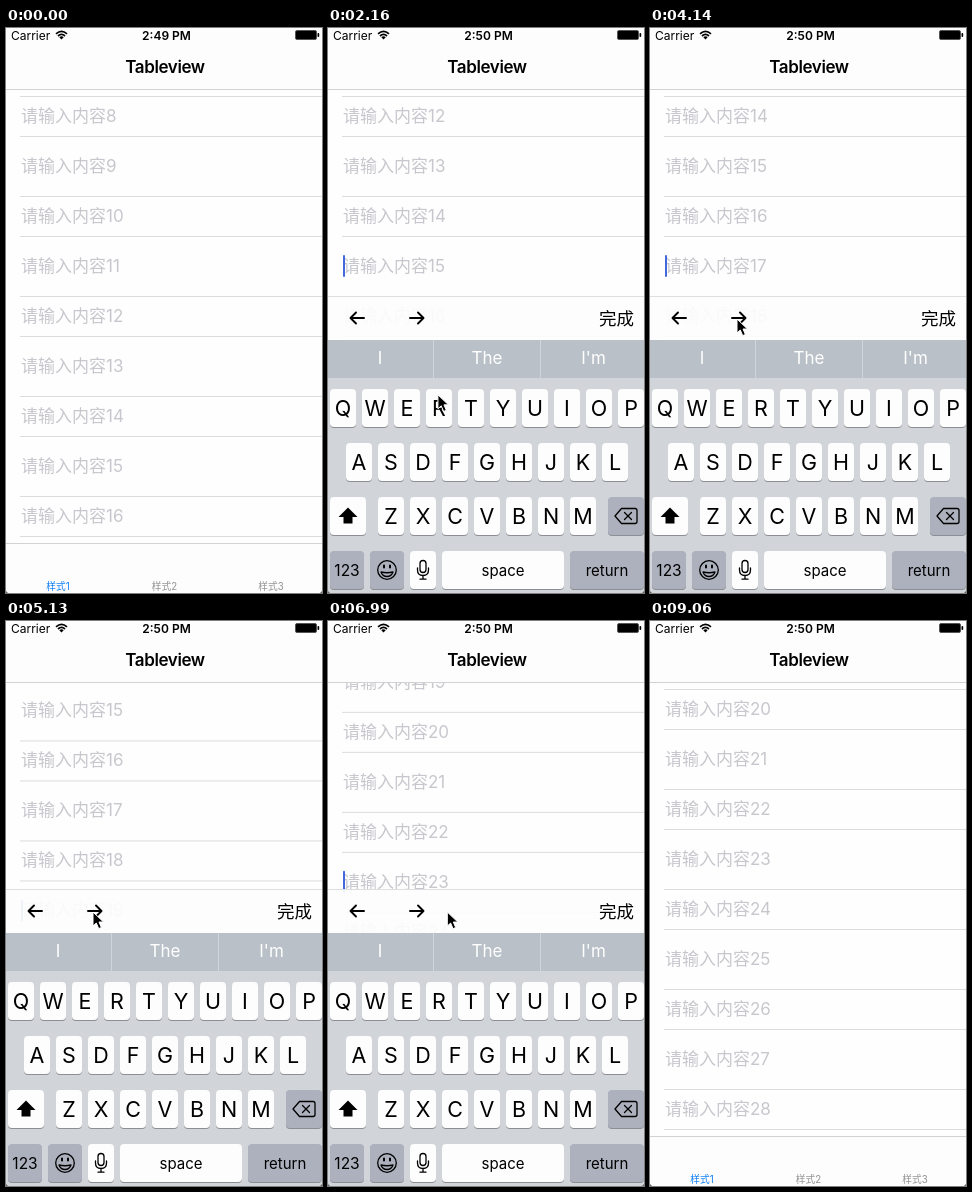
Write an HTML page that moves like this. It is 316 px wide and 565 px high and loops after 9160 ms.

```html
<!DOCTYPE html>
<html lang="zh-CN">
<head>
<meta charset="utf-8">
<title>Tableview</title>
<style>
html, body { margin: 0; width: 100%; height: 100%; overflow: hidden; background: #fefefe; }
svg { display: block; width: 316px; height: 565px; }
text { font-family: Inter, "Noto Sans CJK SC", "Noto Sans CJK", sans-serif; }
.mid { text-anchor: middle; }
.row { font-size: 17px; fill: #c7c7cd; }
.line { fill: none; stroke: #000; stroke-linecap: round; stroke-linejoin: round; }
</style>
</head>
<body>
<svg viewBox="0 0 316 565">
  <rect width="316" height="565" fill="#fefefe"/>
  <g id="list"></g>
  <rect id="caret" x="15" width="2" height="22" rx="1" fill="#4468dc"/>

  <rect width="316" height="61" fill="#fdfdfd"/>
  <rect y="61" width="316" height="1" fill="#d2d2d4"/>
  <text x="5" y="11.5" font-size="12">Carrier</text>
  <g class="line" stroke-width="1.7" style="stroke-linecap:butt">
    <path d="M50 5.8Q55.5 .9 61 5.8M52 8Q55.5 4.9 59 8"/>
  </g>
  <path d="M53.3 9.3Q55.5 7.4 57.7 9.3L55.5 11.6z"/>
  <text id="clock" class="mid" x="160.5" y="11.5" font-size="12" font-weight="600"></text>
  <rect x="289.5" y="2.5" width="21" height="9" rx="1.5" fill="#000" stroke="#555"/>
  <rect x="311.5" y="5" width="1.7" height="4" rx=".8"/>
  <text class="mid" x="159" y="45" font-size="17" font-weight="600" letter-spacing="-.4">Tableview</text>

  <rect y="515" width="316" height="50" fill="#fdfdfd"/>
  <rect y="515" width="316" height="1" fill="#d2d2d4"/>
  <g class="mid" font-size="9.7" fill="#929292">
    <text x="52" y="561.5" fill="#0a7cf5">样式1</text>
    <text x="158.5" y="561.5">样式2</text>
    <text x="265" y="561.5">样式3</text>
  </g>

  <g id="keyboard">
    <g id="toolbar">
      <rect y="268" width="316" height="44" fill="#fdfdfd" opacity=".93"/>
      <rect y="268" width="316" height="1" fill="#dededf"/>
      <path class="line" stroke-width="1.9" d="M36 290H23M28 284.5L22.5 290L28 295.5M82 290H95M90 284.5L95.5 290L90 295.5"/>
      <text class="mid" x="288.5" y="296.5" font-size="17.5">完成</text>
    </g>
    <rect y="312" width="316" height="253" fill="#d1d5da"/>
    <rect y="312" width="316" height="38" fill="#b9c0c7"/>
    <path d="M105.5 312v38M212.5 312v38" stroke="#d1d5da"/>
    <g class="mid" font-size="17" fill="#fff">
      <text x="52" y="336">I</text>
      <text x="159" y="336">The</text>
      <text x="265.5" y="336">I'm</text>
    </g>
    <g id="keys"></g>
    <path d="M20 479.5L29.5 489H24.5V495.5H15.5V489H10.5z"/>
    <path class="line" stroke-width="1.3" d="M287 488L293.5 480.5H307Q309 480.5 309 482.5V493.5Q309 495.5 307 495.5H293.5zM296.5 484.5L303.5 491.5M303.5 484.5L296.5 491.5"/>
    <g class="line" stroke-width="1.3">
      <circle cx="59" cy="542" r="9.3"/>
      <path d="M53 544Q59 545.5 65 544Q63.5 548.5 59 548.5T53 544z"/>
      <path d="M56 537.5v2M62 537.5v2" stroke-width="2"/>
      <rect x="92" y="532.5" width="6" height="12" rx="3"/>
      <path d="M89.5 540v2Q89.5 547.5 95 547.5T100.5 542v-2M95 547.5v3.5M92 551.2h6"/>
    </g>
  </g>

  <path d="M0 563v2h2zM316 563v2h-2z" fill="#666"/>
  <path id="cursor" d="M0 0V14L3.3 11L5.7 16.6L8.4 15.5L6 10H10.5z" stroke="#fff" stroke-linejoin="round"/>
</svg>
<script>
const LOOP = 9160, DURATION = 400, SHOW = 1584, HIDE = 8040, FIRST = 15;
// times at which the focus moves to the next field
const presses = [2960, 3650, 4350, 5036, 5300, 5560, 6170, 6759];
// pointer path: time, x, y
const path = [
  [480, 55, 568], [820, 95, 243], [1350, 131, 417], [1880, 131, 417],
  [2440, 89, 317], [2780, 87, 291], [6800, 87, 291], [6990, 119, 291],
  [7240, 200, 304], [7570, 284, 289], [8180, 284, 289], [8570, 291, 568]
];

const $ = id => document.getElementById(id);
const clamp = v => Math.min(1, Math.max(0, v));
const ramp = (t, start, length) => clamp((t - start) / length);
const ease = (t, start) => {
  const p = ramp(t, start, DURATION);
  return p * p * (3 - 2 * p);
};

// Even rows are 40 high, odd rows 60, so their centres lie 50 apart.
const padding = n => n % 2 ? 30 : 20;
let rows = '';
for (let n = 4; n < 34; n++) {
  rows += `<text class="row" x="15" y="${n * 50 + 6}">请输入内容${n}</text>
    <rect x="14" y="${n * 50 + padding(n)}" width="302" height="1" fill="#dcdcdf"/>`;
}
$('list').innerHTML = rows;

function key(x, y, width, label = '', size = 15, fill = '#fdfdfd') {
  return `<rect x="${x}" y="${y + 1}" width="${width}" height="38" rx="4" fill="#8b8e94"/>
    <rect x="${x}" y="${y}" width="${width}" height="38" rx="4" fill="${fill}"/>
    <text class="mid" x="${x + width / 2}" y="${y + 19 + size * .37}" font-size="${size}">${label}</text>`;
}
const letters = (word, x, y) => [...word].map((c, i) => key(x + i * 32, y, 26, c, 21.5)).join('');
const GREY = '#acb1bd';
$('keys').innerHTML =
  letters('QWERTYUIOP', 2, 361) + letters('ASDFGHJKL', 18, 415) + letters('ZXCVBNM', 50, 469) +
  key(2, 469, 36) + key(280, 469, 36, '', 15, GREY) +
  key(2, 523, 34, '123', 15.5, GREY) + key(42, 523, 34, '', 15, GREY) + key(82, 523, 26) +
  key(114, 523, 122, 'space') + key(242, 523, 74, 'return', 15, GREY);

const move = (id, x, y) => $(id).setAttribute('transform', `translate(${x} ${y})`);

function caretOpacity(t, focusTime) {
  if (t < SHOW || t >= HIDE) return 0;
  const phase = (t - focusTime) % 1000;
  return 1 - ramp(phase, 690, 120) + ramp(phase, 920, 80);
}

function drawCursor(t) {
  const i = path.findIndex(p => p[0] > t);
  $('cursor').style.display = i > 0 ? '' : 'none';
  if (i < 1) return;
  const [t0, x0, y0] = path[i - 1], [t1, x1, y1] = path[i];
  const p = ramp(t, t0, t1 - t0);
  move('cursor', x0 + (x1 - x0) * p, y0 + (y1 - y0) * p);
}

function draw(now) {
  const t = now % LOOP;
  let scroll = 312 + 200 * ease(t, SHOW), focus = FIRST, focusTime = SHOW;
  presses.forEach((time, i) => {
    if (t < time) return;
    focus = FIRST + 1 + i;
    focusTime = time;
    scroll += 2 * padding(focus) * ease(t, time);
  });
  move('list', 0, -scroll);
  $('caret').setAttribute('y', focus * 50 - scroll - 11);
  $('caret').style.opacity = caretOpacity(t, focusTime);
  move('keyboard', 0, 253 * (1 - ease(t, SHOW)) + 297 * ease(t, HIDE));
  $('toolbar').style.opacity = ramp(t, 1860, 120);
  $('clock').textContent = t < 1700 ? '2:49 PM' : '2:50 PM';
  drawCursor(t);
  requestAnimationFrame(draw);
}
draw(0);
</script>
</body>
</html>
```
